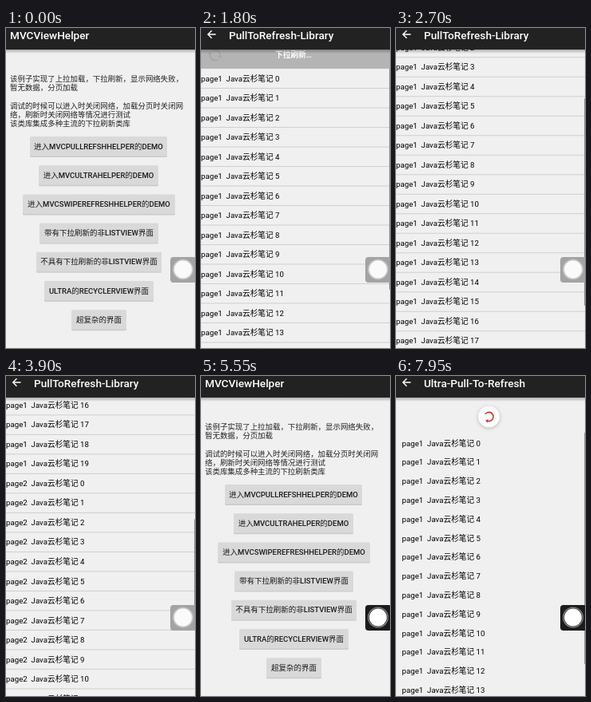
These frames come from a looping animation (237x401 px, 8000 ms). An HTML page with a canvas:

```html
<!DOCTYPE html>
<html lang="zh-CN">
<head>
<meta charset="utf-8">
<title>MVCViewHelper</title>
<style>
html, body { margin: 0; width: 100%; height: 100%; overflow: hidden; background: #f0f0f0; }
canvas { display: block; width: 237px; height: 401px; }
</style>
</head>
<body>
<canvas id="stage"></canvas>
<script>
const W = 237, H = 401, BAR = 27, VIEW = H - BAR;
const LOOP = 8000, STEP = 150;
const FONT = 'Roboto, "Noto Sans CJK SC", "Noto Sans CJK", sans-serif';
const BOOK = 'Java云杉笔记';
const ROW = 24.5, ULTRA_ROW = 23.8;

const canvas = document.getElementById('stage');
const dpr = window.devicePixelRatio || 1;
canvas.width = W * dpr;
canvas.height = H * dpr;
const ctx = canvas.getContext('2d');

const intro = [
  [67, '该例子实现了上拉加载，下拉刷新，显示网络失败，'],
  [78, '暂无数据，分页加载'],
  [101, '调试的时候可以进入时关闭网络，加载分页时关闭网'],
  [112, '络，刷新时关闭网络等情况进行测试'],
  [123, '该类库集成多种主流的下拉刷新类库']
];

// left, right, label
const buttons = [
  [30, 202, '进入MVCPULLREFSHHELPER的DEMO'],
  [41, 191, '进入MVCULTRAHELPER的DEMO'],
  [21, 212, '进入MVCSWIPEREFRESHHELPER的DEMO'],
  [42, 191, '带有下拉刷新的非LISTVIEW界面'],
  [38, 195, '不具有下拉刷新的非LISTVIEW界面'],
  [48, 185, 'ULTRA的RECYCLERVIEW界面'],
  [82, 151, '超复杂的界面']
];

const pullKeys = [[1650, 0], [1800, 24], [2100, 46], [2250, 34], [2400, 34], [2550, 0]];
const scrollKeys = [[2550, 0], [2700, 63.75], [2850, 140.5], [3750, 140.5],
  [3900, 394.6], [4050, 570], [4200, 630.5]];
const ultraKeys = [[7350, 0], [7500, 6], [7650, 18], [7800, 33], [7950, 44]];

function track(keys, t) {
  if (t <= keys[0][0]) return keys[0][1];
  for (let i = 1; i < keys.length; i++) {
    const [t0, a] = keys[i - 1], [t1, b] = keys[i];
    if (t <= t1) return a + (b - a) * (t - t0) / (t1 - t0);
  }
  return keys[keys.length - 1][1];
}

function rect(x, y, w, h, color) {
  ctx.fillStyle = color;
  ctx.fillRect(x, y, w, h);
}

function round(x, y, w, h, r, color) {
  ctx.fillStyle = color;
  ctx.beginPath();
  ctx.roundRect(x, y, w, h, r);
  ctx.fill();
}

function disc(x, y, r, color) {
  ctx.fillStyle = color;
  ctx.beginPath();
  ctx.arc(x, y, r, 0, Math.PI * 2);
  ctx.fill();
}

function text(str, x, y, size, color, weight = 400, align = 'left') {
  ctx.font = `${weight} ${size}px ${FONT}`;
  ctx.textAlign = align;
  ctx.fillStyle = color;
  ctx.fillText(str, x, y);
}

function arcArrow(x, y, r, from, to, color, width) {
  ctx.strokeStyle = ctx.fillStyle = color;
  ctx.lineWidth = width;
  ctx.beginPath();
  ctx.arc(x, y, r, from, to);
  ctx.stroke();
  ctx.save();
  ctx.translate(x + r * Math.cos(to), y + r * Math.sin(to));
  ctx.rotate(to);
  ctx.beginPath();
  ctx.moveTo(-width * 1.5, 0);
  ctx.lineTo(width * 1.5, 0);
  ctx.lineTo(0, width * 2);
  ctx.fill();
  ctx.restore();
}

function appBar(title, back) {
  const shade = ctx.createLinearGradient(0, BAR, 0, BAR + 5);
  shade.addColorStop(0, 'rgba(0,0,0,.28)');
  shade.addColorStop(1, 'rgba(0,0,0,0)');
  rect(0, BAR, W, 5, shade);
  rect(0, 0, W, BAR, '#222');
  text(title, back ? 35 : 5, 13.5, 13.6, '#fff', 500);
  if (!back) return;
  ctx.strokeStyle = '#fff';
  ctx.lineWidth = 1.4;
  ctx.beginPath();
  ctx.moveTo(18.5, 8);
  ctx.lineTo(9, 8);
  ctx.moveTo(13.5, 3.2);
  ctx.lineTo(8.7, 8);
  ctx.lineTo(13.5, 12.8);
  ctx.stroke();
}

function clipBody(draw) {
  ctx.save();
  ctx.beginPath();
  ctx.rect(0, BAR, W, VIEW);
  ctx.clip();
  draw();
  ctx.restore();
}

function home(pressed) {
  rect(0, 0, W, H, '#f0f0f0');
  appBar('MVCViewHelper', false);
  for (const [y, line] of intro) text(line, 5, y, 9.45, '#222');
  buttons.forEach(([l, r, label], i) => {
    const y = 136 + i * 36.2;
    round(l, y + 1, r - l, 25, 1.5, 'rgba(0,0,0,.16)');
    round(l, y, r - l, 24.6, 1.5, i === pressed ? '#c4c5c5' : '#d9d9d9');
    text(label, (l + r) / 2, Math.round(y + 15.6), 9.5, '#1a1a1a', 500, 'center');
  });
}

function loading(t) {
  const a = t / 130;
  ctx.strokeStyle = '#009688';
  ctx.lineWidth = 2;
  ctx.beginPath();
  ctx.arc(W / 2, 205, 9, a, a + 4);
  ctx.stroke();
  text('加载中...', W / 2, 230, 9.5, '#555', 400, 'center');
}

function thumb(top, size, alpha) {
  rect(W - 1, top, 1, size, `rgba(120,120,120,${alpha * 0.8})`);
}

function refreshHeader(t, pull) {
  rect(0, BAR, W, pull, '#b4b4b4');
  const y = BAR + pull - 17;
  const spin = pull / 24 + (t >= 2250 ? t / 200 : 0);
  for (const a of [spin, spin + Math.PI]) arcArrow(17.5, y, 6.5, a, a + 2.3, '#a6a6a6', 1.8);
  const label = t < 1950 ? '下拉刷新…' : t < 2250 ? '放开以刷新…' : '正在载入…';
  text(label, 116, y + 3, 9.7, '#fff', 700, 'center');
}

function listThumb(t, pull, scroll) {
  const items = t < 3300 ? 22 : 42;
  const first = scroll > 0 ? scroll / ROW + 1 : 0;
  const shown = VIEW / ROW + (scroll > 0 ? 0 : 1);
  let alpha = 0;
  if ((t >= 1800 && t < 3300) || (t >= 3900 && t < 4500)) alpha = 1;
  else if (t >= 4500 && t < 4650) alpha = 0.4;
  if (alpha) thumb(BAR + pull + first / items * VIEW, shown / items * VIEW, alpha);
}

function pullPage(t) {
  rect(0, 0, W, H, '#f0f0f0');
  clipBody(() => {
    if (t < 1200) {
      if (t >= 600) loading(t);
      return;
    }
    const pull = track(pullKeys, t), scroll = track(scrollKeys, t);
    const count = t < 3300 ? 20 : t < 4500 ? 40 : 60;
    const top = BAR + pull - scroll;
    for (let i = Math.floor(scroll / ROW); i <= count; i++) {
      const y = top + i * ROW;
      if (y > H) break;
      const base = Math.round(y + 15.6);
      if (i === count) {
        text('正在加载中..', W / 2, base, 9.7, '#555', 400, 'center');
      } else {
        const page = Math.floor(i / 20) + 1;
        text(`page${page}  ${BOOK} ${i % 20}`, 0, base, 9.7, '#000');
        rect(0, y + ROW - 0.5, W, 1, '#cfcfcf');
      }
    }
    if (pull > 0) refreshHeader(t, pull);
    listThumb(t, pull, scroll);
  });
  appBar('PullToRefresh-Library', true);
}

function materialHeader(pull) {
  const x = 116.5, y = BAR + pull - 20, k = pull / 44;
  ctx.save();
  ctx.shadowColor = 'rgba(0,0,0,.25)';
  ctx.shadowBlur = 4 * dpr;
  ctx.shadowOffsetY = dpr;
  disc(x, y, 13.5, '#fcfcfc');
  ctx.restore();
  arcArrow(x, y, 5.6, -2.5 * k, 1.8 * k, '#c23a36', 1.6);
}

function ultraPage(t) {
  rect(0, 0, W, H, '#f0f0f0');
  clipBody(() => {
    if (t < 7050) {
      if (t >= 6900) loading(t);
      return;
    }
    const pull = track(ultraKeys, t);
    for (let i = 0; i < 16; i++) {
      text(`page1  ${BOOK} ${i}`, 7.5, Math.round(43.6 + pull + i * ULTRA_ROW), 9.7, '#000');
    }
    if (pull > 0) materialHeader(pull);
    thumb(BAR + pull, 290, 0.9);
  });
  appBar('Ultra-Pull-To-Refresh', true);
}

// A new page fades in while it rises over the home page.
function enter(page, t) {
  home(-1);
  ctx.save();
  ctx.globalAlpha = 0.6;
  ctx.translate(0, 14);
  page(t);
  ctx.restore();
}

function touchButton(dark) {
  round(206, 287, 33, 32, 4, dark ? '#1b1b1d' : '#a3a3a3');
  disc(222, 302.5, 13, dark ? '#858585' : '#bdbdbd');
  disc(222, 302.5, 11.8, dark ? '#3a3a3a' : '#d6d6d6');
  disc(222, 302.5, 10.9, dark ? '#fff' : '#fafafa');
}

function scene(t) {
  if (t < 300) home(-1);
  else if (t < 450) home(0);
  else if (t < 600) enter(pullPage, t);
  else if (t < 5550) pullPage(t);
  else if (t < 6600) home(-1);
  else if (t < 6750) home(1);
  else if (t < 6900) enter(ultraPage, t);
  else ultraPage(t);
  touchButton(t >= 4950);
}

const start = performance.now();
function frame() {
  const t = (performance.now() - start) % LOOP;
  ctx.setTransform(dpr, 0, 0, dpr, 0, 0);
  scene(Math.floor(t / STEP) * STEP);
  requestAnimationFrame(frame);
}
frame();
</script>
</body>
</html>
```
